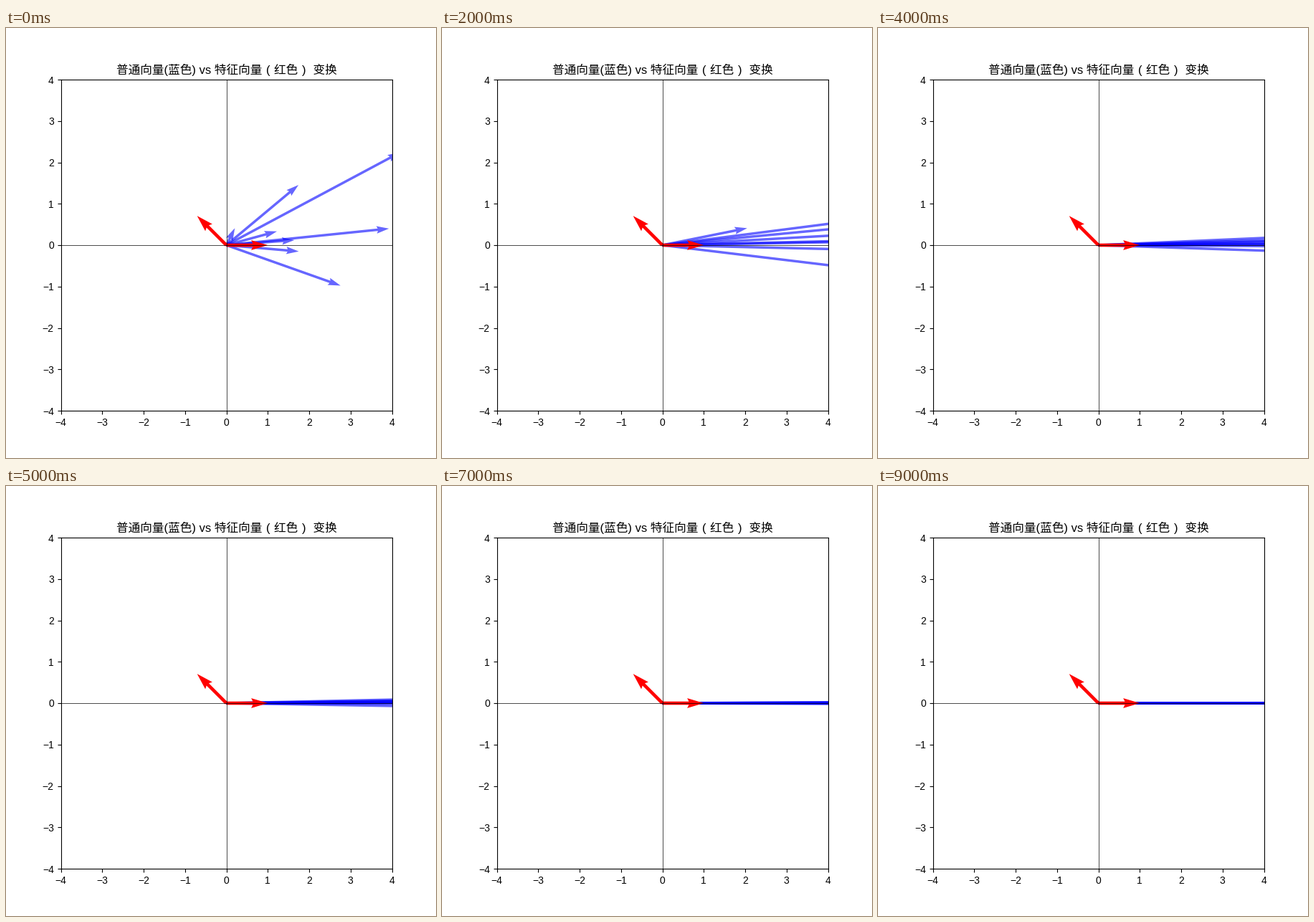
Recreate the animation shown at these times as a matplotlib script. Size 600 by 600 pixels, loop 10 s.

```python
import numpy as np
import matplotlib.pyplot as plt
from matplotlib.animation import FuncAnimation

plt.rcParams["font.family"] = ["Liberation Sans", "Noto Sans CJK JP"]

FRAMES = 10
MATRIX = np.array([[2.0, 1.0], [0.0, 1.0]])
VECTORS = np.random.RandomState(0).randn(8, 2)
EIGEN = np.array([[1.0, 0.0], [-np.sqrt(0.5), np.sqrt(0.5)]])

fig, ax = plt.subplots(figsize=(6, 6), dpi=100)
ax.set(xlim=(-4, 4), ylim=(-4, 4), aspect="equal")
ax.axhline(0, color="black", linewidth=0.5)
ax.axvline(0, color="black", linewidth=0.5)

# The wide brackets sit centred in their cells.
ax.set_title("普通向量(蓝色) vs 特征向量\u3000红色\u3000 变换")
for x, bracket in ((365.5, "("), (415.5, ")")):
    fig.text(x / 600, 0.88 + 25 / 3 / 600, bracket, fontsize=12, ha="center")


def arrows(tips, **style):
    start = np.zeros(len(tips))
    return ax.quiver(start, start, tips[:, 0], tips[:, 1], angles="xy",
                     scale_units="xy", scale=1, **style)


def transformed(step):
    return VECTORS @ np.linalg.matrix_power(MATRIX, step + 1).T


blue = arrows(transformed(0), color="blue", alpha=0.6, width=0.0075)
red = arrows(EIGEN, color="red", width=0.01)


def update(step):
    tips = transformed(step)
    blue.set_UVC(tips[:, 0], tips[:, 1])
    return blue, red


anim = FuncAnimation(fig, update, frames=FRAMES, interval=1000,
                     init_func=lambda: update(0), repeat=True)
plt.show()
```
